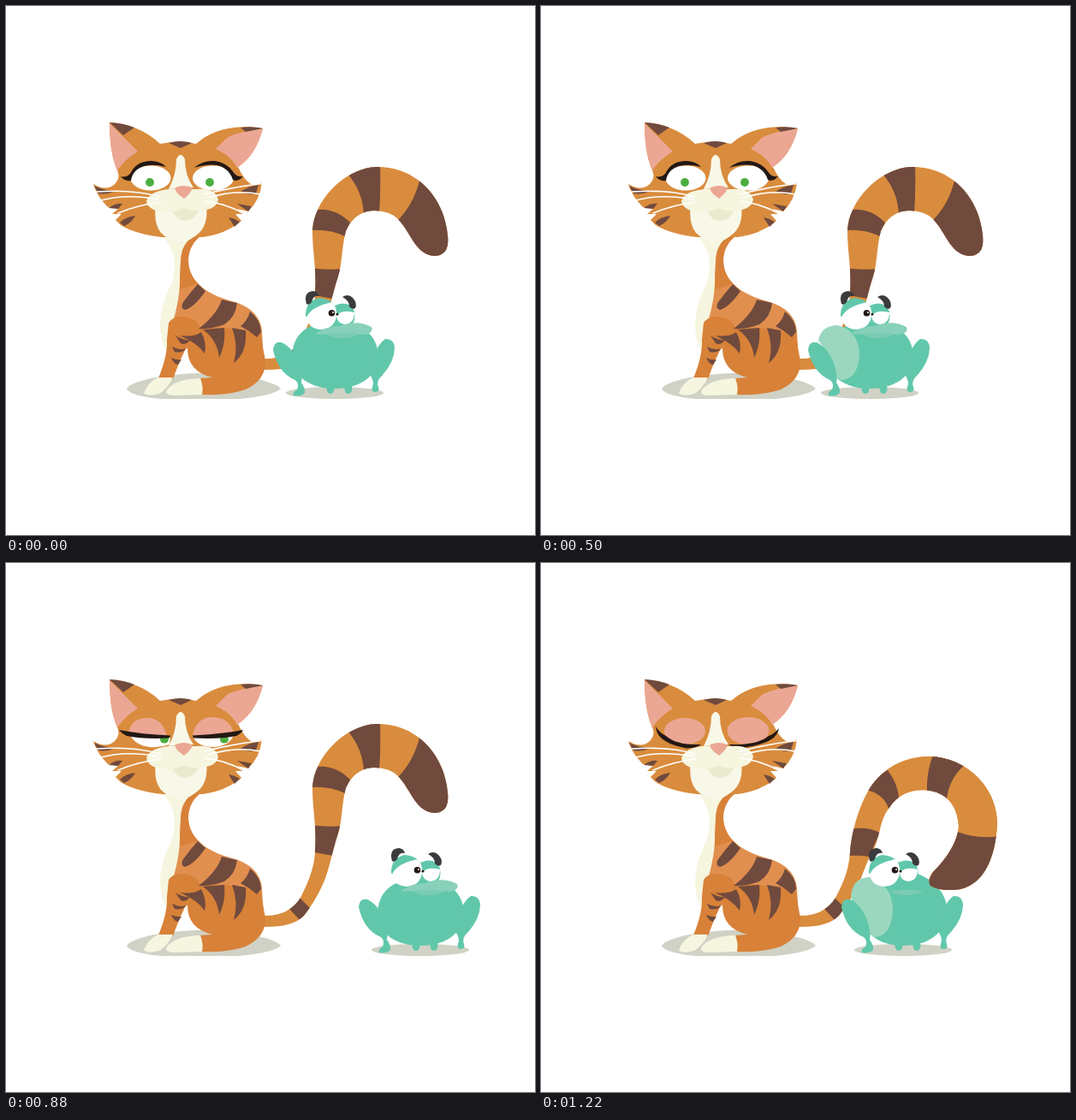
Write an HTML page that moves like this. It is 618 px wide and 618 px high and loops after 1.3 s.

```html
<!DOCTYPE html>
<html lang="en">
<head>
<meta charset="utf-8">
<title>Cat and frog</title>
<style>
  html, body { margin: 0; width: 100%; height: 100%; overflow: hidden; background: #fff; }
  svg { display: block; width: 100%; height: 100%; }
  .dark { fill: #704a3d; }
  .orange { fill: #d98c3d; }
  .rust { fill: #d88138; }
  .coat { fill: #e18f4f; }
  .cream { fill: #f6f5df; }
  .milk { fill: #f8f8e9; }
  .pink { fill: #eba793; }
  .ink { fill: #231815; }
  .iris { fill: #4bae3f; }
  .shade { fill: #d0d2c5; }
  .skin { fill: #61c7ab; }
  .pale { fill: #9bd7bf; }
  .lip { fill: #88d0b9; }
  .white { fill: #fff; }
  .brow { fill: #3b3a3c; }
  .line { fill: none; stroke-linecap: round; }
</style>
</head>
<body>
<svg viewBox="0 0 618 618">
  <defs>
    <clipPath id="floor"><rect width="618" height="459"/></clipPath>
    <clipPath id="tailClip"><path id="tailEdge"/></clipPath>
  </defs>

  <path class="shade" clip-path="url(#floor)" d="M141 447C147 437 190 429 231 429S314 438 321 447C312 456 270 461 231 461S145 458 141 447Z"/>

  <g id="tail">
    <path id="tailFur" class="orange"/>
    <g clip-path="url(#tailClip)">
      <path class="dark" d="M343 391L356 404 344 418 331 404Z"/>
      <path id="tailBands" class="dark"/>
    </g>
  </g>

  <g id="body">
    <path class="cream" d="M178 262Q189 275 193 284Q201 302 193 325Q180 350 180 375Q181 394 188 403L205 375 206 300Q206 280 224 266Z"/>
    <path class="coat" d="M213 299Q214 318 232 331Q247 341 268 346Q296 355 299 379L300 400 196 400 190 385Q202 350 203 325L204 300Z"/>
    <path class="rust" d="M232 266C219 273 213 285 213 299Q214 318 232 331L222 325 203 331Q203 315 204 300C204 285 209 275 221 267Z"/>
    <path class="rust" d="M216 378Q250 371 298 384Q300 400 303 414Q304 437 280 448Q260 455 229 454L227 435 241 434Q212 427 212 400Z"/>
    <path class="rust" d="M190 370Q195 362 207 363Q226 365 227 380Q226 388 215 391Q204 410 195 436L178 435Q189 408 188 390Z"/>
    <path class="cream" d="M178 434L195 434Q189 447 179 453Q165 457 161 452Q166 439 178 434Z"/>
    <path class="cream" d="M187 450Q195 436 227 435Q231 445 229 454L197 455Q186 455 187 450Z"/>
    <g class="dark">
      <path d="M224 325L233 333Q220 352 209 355Q203 353 207 346Q215 335 224 325Z"/>
      <path d="M252 343L270 347Q268 364 255 372Q240 378 225 377Q247 360 252 343Z"/>
      <path d="M285 357Q298 367 298 381L293 387Q284 379 274 374Q282 368 285 357Z"/>
      <path d="M203 385Q220 387 228 381Q235 393 232 406Q224 394 203 385Z"/>
      <path d="M230 378L255 376Q257 395 249 411Q247 390 230 378Z"/>
      <path d="M264 376L280 379Q282 405 266 417Q272 397 264 376Z"/>
      <path d="M198 385Q207 391 215 390Q210 397 204 394Z"/>
      <path d="M194 398Q203 403 211 400Q205 406 197 404Z"/>
      <path d="M193 411Q200 414 205 413L201 419Q196 418 193 411Z"/>
    </g>
  </g>

  <g id="face">
    <path class="orange" d="M121 136C142 137 163 145 180 161Q204 156 222 161C243 143 270 138 300 143Q292 174 271 188Q278 203 286 208Q293 209 299 206Q297 226 283 240L270 237 279 243 268 243 275 251Q258 266 230 270L182 270Q150 266 134 256L128 250 135 243 124 243 131 237 119 235Q106 222 102 208Q117 217 127 208Q134 201 130 192Q121 172 121 136Z"/>
    <path class="pink" d="M121 137L154 170Q140 178 130 192Q121 172 121 137Z"/>
    <path class="dark" d="M121 136Q138 137 150 142L137 151Z"/>
    <path class="pink" d="M300 143Q270 147 258 154L245 167Q263 175 270 189Q292 175 300 143Z"/>
    <path class="dark" d="M274 142Q288 140 300 143L280 147Z"/>
    <path class="dark" d="M190 160Q204 156 217 160L204 166Z"/>
    <g class="dark">
      <path d="M103 210Q115 216 128 216Q118 221 108 219Z"/>
      <path d="M120 236Q128 230 136 231L131 237Z"/>
      <path d="M133 253Q140 246 151 245Q147 253 138 257Z"/>
      <path d="M274 217Q284 210 295 209L292 219Q284 221 274 217Z"/>
      <path d="M270 231L287 234 283 240Z"/>
      <path d="M260 247Q267 248 273 252L267 258Z"/>
    </g>
    <g id="eyes"></g>
    <path class="milk" d="M175 232L234 232Q237 258 222 268Q212 276 203 276Q190 274 181 265Q172 254 175 232Z"/>
    <path class="milk" d="M199 179Q204 169 209 179Q209 198 219 212L190 214Q199 197 199 179Z"/>
    <path style="fill:#eaebce" d="M193 236Q198 251 209 251Q222 250 227 235L209 230Z"/>
    <path class="cream" d="M190 214L222 214Q244 212 248 226Q246 238 227 239Q213 240 208 236Q200 241 188 241Q166 240 164 228Q168 216 190 214Z"/>
    <path class="pink" d="M198 212Q208 208 217 212Q219 216 208 225Q196 217 198 212Z"/>
    <g class="line" stroke="#fff" stroke-width="1.7">
      <path d="M180 223Q150 214 106 217M178 226Q140 219 111 227M181 229Q155 232 131 242"/>
      <path d="M232 220Q262 212 302 207M236 224Q268 214 297 220M233 228Q258 231 279 243"/>
    </g>
  </g>

  <g id="frog">
    <ellipse id="frogShade" class="shade" cx="384" cy="452" rx="57" ry="7"/>
    <g id="frogBody"></g>
    <g id="frogHead">
      <path class="skin" d="M350 362Q350 344 366 341Q379 342 384 350Q394 345 403 350Q409 356 407 367L402 378 370 380Z"/>
      <path class="white" d="M351 364Q356 351 381 346Q389 355 385 367Q380 378 368 378Q353 377 351 364Z"/>
      <path class="white" d="M386 362Q392 354 407 358Q407 371 396 372Q387 371 386 362Z"/>
      <circle class="ink" cx="380.5" cy="358.8" r="3.8"/>
      <circle class="white" cx="382" cy="358" r="1"/>
      <circle class="ink" cx="387" cy="360.2" r="1.4"/>
      <g id="frogBrows"></g>
      <path id="frogLip"/>
      <path fill="#7bccb3" d="M374 383Q395 381 414 383Q405 388 393 388Q382 388 374 383Z"/>
    </g>
    <g id="frogLegs"></g>
  </g>
  <use id="tailFront" href="#tail"/>
</svg>
<script>
const $ = id => document.getElementById(id);
const path = (cls, d, extra = '') => `<path class="${cls}" d="${d}" ${extra}/>`;
const oval = (cls, x, y, rx, ry, turn = 0) =>
  `<ellipse class="${cls}" cx="${x}" cy="${y}" rx="${rx}" ry="${ry}" transform="rotate(${turn} ${x} ${y})"/>`;

// Tail outlines run up the left side, round the tip and back down.
const tailRoot = 'M300 412C322 413 336 404 344 391';
const tailEnd = 'C362 392 356 402 348 412Q335 426 300 425Z';
const curlRise = tailRoot + 'C358 366 360 350 361 338C363 306 378 268 390 255';
const curlFall = 'C394 301 397 325 384 343C378 356 373 372 368 382' + tailEnd;
const curlBands = 'M362 311Q380 307 396 315L383 343Q372 341 357 342ZM386 253L405 242Q417 258 418 275L406 287Q401 270 380 265Z';
const tails = {
  high: {
    edge: tailRoot + 'C356 368 361 350 361 336C363 305 358 290 358 262C360 225 398 189 432 188C480 187 512 224 516 268Q519 292 500 292C478 290 474 266 458 249Q448 239 430 239Q407 240 397 263C392 282 393 300 388 316C380 340 378 360 368 380' + tailEnd,
    bands: 'M354 306Q376 309 394 307L382 342Q370 340 356 337ZM364 238Q385 236 402 253L396 269Q378 260 354 262ZM399 196L437 184Q438 215 436 243L418 244Q417 217 399 196ZM484 200Q477 232 456 252L456 300 530 300 530 200Z'
  },
  press: {
    edge: curlRise + 'C408 236 430 229 460 229C512 230 552 262 558 291C558 325 554 352 548 365Q541 376 529 375Q510 375 508 363C515 345 518 325 519 300C512 283 500 274 485 269C455 262 422 266 407 286' + curlFall,
    bands: curlBands + 'M464 226L507 239Q490 250 485 272L462 267Q460 248 464 226ZM517 300Q540 297 562 290L560 380 500 380Z'
  },
  hook: {
    edge: curlRise + 'C408 234 430 226 454 226C497 227 533 262 533 305C531 340 520 374 490 381Q465 384 455 377Q451 371 457 362C473 346 486 328 488 308C487 288 478 272 459 267C440 262 418 268 407 286' + curlFall,
    bands: curlBands + 'M458 224Q482 226 498 234Q478 248 474 275L451 268Q450 245 458 224ZM484 313Q508 323 536 319L530 390 445 385Z'
  }
};

const eyes = {
  open: look =>
    oval('white', 169, 201, 23.5, 14.5) + oval('white', 242, 201, 24, 14.5) +
    path('ink', 'M134 199Q140 201 145 196Q152 181 170 181Q182 182 187 188Q164 182 152 192Q147 197 146 204Q138 205 134 199Z') +
    path('ink', 'M220 189Q230 180 244 181Q259 183 267 196Q271 200 277 199Q271 206 265 203Q261 190 247 186Q234 184 220 189Z') +
    oval('iris', 168 + look, 206, 4.9, 4.9) + oval('iris', 238 + look, 206, 4.9, 4.9),
  half: look =>
    path('pink', 'M143 199Q146 181 165 181Q183 181 188 203Z') + path('pink', 'M218 203Q221 180 242 180Q262 181 266 199Z') +
    path('white', 'M145 201L192 204 191 212Q180 216 168 215Q151 213 145 201Z') +
    path('white', 'M219 204L266 201Q261 214 243 215Q225 215 219 204Z') +
    oval('iris', 168 + look, 206, 5, 4.6) + oval('iris', 238 + look, 206, 5, 4.6) +
    path('ink', 'M132 195Q158 200 192 201.5L191 204.5Q160 206 141 202Q135 199 132 195Z') +
    path('ink', 'M277 195Q251 200 218 201.5L219 204.5Q250 206 269 202Q275 199 277 195Z'),
  shut: () =>
    oval('pink', 168, 196.5, 24, 15.5) + oval('pink', 242, 196, 24.5, 16) +
    path('ink', 'M134 191Q139 199 146 202Q158 213 187 212Q182 216 170 216.5Q147 212 139 203Q135 199 134 191Z') +
    path('ink', 'M278 193Q272 200 266 202Q253 213 219 212Q225 216 238 215.5Q262 212 272 204Q277 199 278 193Z')
};

const sitLegs =
  path('skin', 'M312 402Q313 391 322 393Q334 398 342 417Q347 432 345 440Q350 447 349 452Q344 457 336 455Q334 452 340 448Q343 442 338 437Q318 429 312 402Z') +
  path('skin', 'M454 399Q453 388 443 389Q429 399 425 430Q431 440 428 445Q426 451 432 451Q437 450 435 445Q432 438 440 431Q454 415 454 399Z');
const toes = oval('skin', 379, 447, 4.5, 6) + oval('skin', 400, 447, 4.5, 6);
const sitBody = toes +
  path('skin', 'M334 409C335 385 350 369 384 369S434 386 435 409C434 434 412 447 384 447S335 434 334 409Z');
const lips = {
  beak: 'M361 384Q372 374 390 374Q411 366 427 375Q430 382 418 384Q390 381 361 384Z',
  flat: 'M361 384Q375 376 388 372Q411 369 428 382Q397 385 361 384Z',
  none: ''
};
const thickBrows =
  path('brow', 'M351 348Q347 334 359 333Q365 334 366 339Q359 337 357 346Q354 350 351 348Z') +
  path('brow', 'M393 340Q399 336 404 340Q411 346 408 353Q404 355 401 351Q401 344 393 340Z');
const thinBrows =
  path('brow', 'M351 341Q350 328 360 326Q365 327 366 331Q357 330 354 339Z') +
  path('brow', 'M393 333Q401 329 406 334Q411 340 408 346L405 346Q405 336 393 333Z');

const frogs = {
  sit: { body: sitBody, legs: sitLegs, brows: thickBrows, lip: 'beak' },
  puff: {
    body: sitBody + path('pale', 'M324 391Q327 373 347 373Q372 380 372 408Q370 437 350 437L340 430Q337 405 324 391Z'),
    legs: sitLegs, brows: thickBrows, lip: 'beak'
  },
  tug: {
    body: toes +
      path('skin', 'M324 392C325 375 338 366 352 366L390 360C412 364 434 380 436 406C434 434 412 447 384 447S335 434 324 392Z') +
      path('pale', 'M323 391Q324 367 345 367Q372 376 372 406Q370 437 350 437L340 430Q337 405 323 391Z'),
    legs: sitLegs, brows: thickBrows, lip: 'none'
  },
  squash: {
    body: path('skin', 'M331 411C331 391 338 374 352 367L404 366C428 370 441 391 441 412C440 440 418 454 386 454S332 440 331 411Z') +
      path('pale', 'M330 388Q335 380 345 380Q364 384 365 406Q363 429 350 430L343 428Z'),
    legs: path('skin', 'M312 401Q314 391 323 393Q335 398 343 417Q350 434 348 446Q351 452 344 456Q336 457 336 452L341 447Q318 432 312 401Z') +
      path('skin', 'M454 399Q452 387 442 390Q430 400 426 440Q431 445 428 450Q431 454 435 451L432 444Q454 425 454 399Z'),
    brows: thinBrows, lip: 'flat'
  },
  leap: {
    body: path('line', 'M425 404Q404 401 396 407Q383 426 358 432M432 422Q411 419 403 426Q386 441 364 445', 'stroke="#61c7ab" stroke-width="6.5"') +
      oval('skin', 534, 414, 6, 3.5, 15) + oval('skin', 516, 428, 8, 3.5, 25) +
      path('skin', 'M416 402C416 378 438 373 480 371C520 370 538 382 537 400C535 421 520 429 490 429C440 430 416 425 416 402Z'),
    legs: '', brows: thickBrows, lip: 'beak'
  }
};

const loop = 1300;
const poses = [
  { at: 0, eye: 'open', look: 0, tail: 'high', frog: 'sit', x: 0 },
  { at: 400, eye: 'open', look: 0, tail: 'high', frog: 'squash', x: 0 },
  { at: 500, eye: 'open', look: 0, tail: 'high', frog: 'puff', x: 0 },
  { at: 600, eye: 'half', look: 14, tail: 'high', frog: 'leap', x: 0, head: 120 },
  { at: 700, eye: 'half', look: 17, tail: 'high', frog: 'sit', x: 100 },
  { at: 1000, eye: 'half', look: 19, tail: 'press', frog: 'squash', x: 100 },
  { at: 1100, eye: 'shut', look: 0, tail: 'hook', frog: 'tug', x: 39, head: -6 }
];

// Only the curled end of the tail passes in front of the frog.
$('tailFront').style.clipPath = 'inset(220px 0 0 440px) view-box';

let shown;
function draw(time) {
  const t = time % loop;
  const pose = poses.filter(p => p.at <= t).pop();
  if (pose === shown) return;
  shown = pose;

  const tail = tails[pose.tail];
  $('tailEdge').setAttribute('d', tail.edge);
  $('tailFur').setAttribute('d', tail.edge);
  $('tailBands').setAttribute('d', tail.bands);
  $('tailFront').style.display = pose.tail === 'high' ? 'none' : '';

  $('eyes').innerHTML = eyes[pose.eye](pose.look);

  const frog = frogs[pose.frog];
  $('frog').setAttribute('transform', `translate(${pose.x} 0)`);
  $('frogHead').setAttribute('transform', `translate(${pose.head || 0} 0)`);
  $('frogShade').style.display = pose.frog === 'leap' ? 'none' : '';
  $('frogBody').innerHTML = frog.body;
  $('frogLegs').innerHTML = frog.legs;
  $('frogBrows').innerHTML = frog.brows;
  $('frogLip').setAttribute('d', lips[frog.lip]);
  $('frogLip').setAttribute('class', pose.frog === 'leap' ? 'pale' : 'lip');
}

const start = performance.now();
function tick() {
  draw(performance.now() - start);
  requestAnimationFrame(tick);
}
tick();
</script>
</body>
</html>
```
